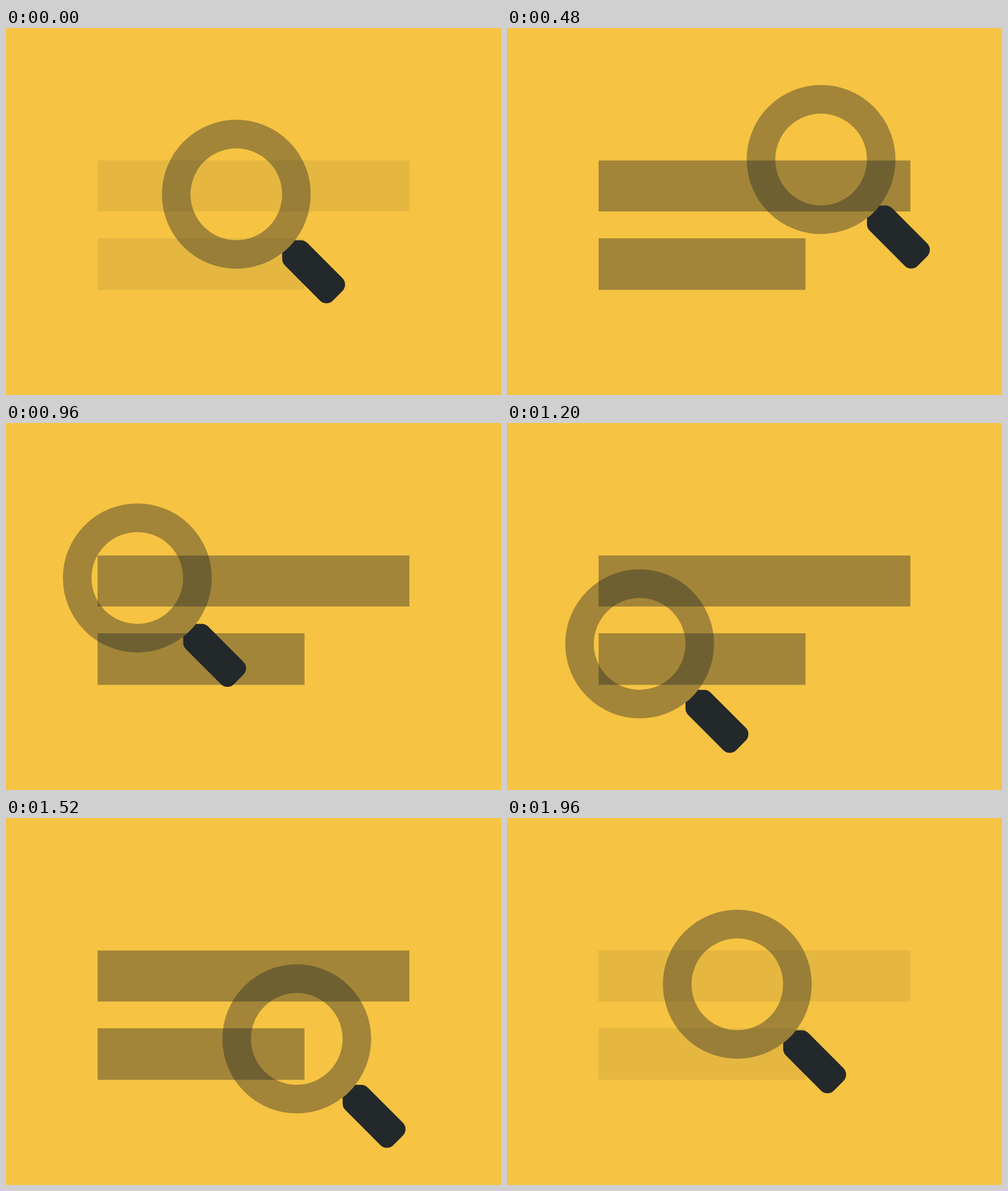
An HTML page that plays this animation: 870x644 px, repeating every 2000 ms.

```html
<!DOCTYPE html>
<html lang="en">
<head>
<meta charset="utf-8">
<title>Search</title>
<style>
  html, body { margin: 0; width: 100%; height: 100%; overflow: hidden; background: #f6c342; }
  svg { display: block; width: 870px; height: 644px; }
</style>
</head>
<body>
<svg viewBox="0 0 870 644" fill="#23282a">
  <g id="bars">
    <rect x="161" y="232.5" width="548" height="89.5"/>
    <rect x="161" y="369" width="363.6" height="90.5"/>
  </g>
  <g id="lens">
    <circle r="105.65" fill="none" stroke="#23282a" stroke-width="50.2" stroke-opacity=".4"/>
    <path d="M103 80.6H113.4A16 16 0 0 1 124.7 85.3L186.6 147.2A16 16 0 0 1 186.6 169.6
      L169.6 186.6A16 16 0 0 1 147.2 186.6L85.3 124.7A16 16 0 0 1 80.6 113.4V103
      A130.75 130.75 0 0 0 103 80.6Z"/>
  </g>
</svg>
<script>
const LOOP = 2000, STEP = 40, LAST = LOOP / STEP - 1;
const stops = [[404.8, 291.8], [578.8, 230.8], [230.8, 230.8], [230.8, 387.6], [578.8, 387.6], [404.8, 291.8]];
const legs = stops.length - 1;
const bars = document.getElementById('bars');
const lens = document.getElementById('lens');

// cubic-bezier(.42, 0, 1, 1)
function easeIn(x) {
  let lo = 0, hi = 1;
  for (let i = 0; i < 24; i++) {
    const s = (lo + hi) / 2;
    const at = 1.26 * s * (1 - s) ** 2 + 3 * s * s * (1 - s) + s ** 3;
    if (at < x) lo = s; else hi = s;
  }
  return lo * lo * (3 - 2 * lo);
}

function draw(ms) {
  // the slack keeps timer rounding from showing the previous step
  const step = Math.min(LAST, Math.floor((ms % LOOP) / STEP + 0.1));
  const pos = step / LAST * legs;
  const leg = Math.min(legs - 1, Math.floor(pos));
  const k = easeIn(pos - leg);
  const [x, y] = stops[leg].map((v, i) => v + (stops[leg + 1][i] - v) * k);
  lens.setAttribute('transform', `translate(${x} ${y})`);

  const fade = Math.min(1, pos, legs - pos);
  bars.setAttribute('fill-opacity', 0.08 + 0.32 * fade);
}

const start = performance.now();
function tick() {
  draw(performance.now() - start);
  requestAnimationFrame(tick);
}
tick();
</script>
</body>
</html>
```
